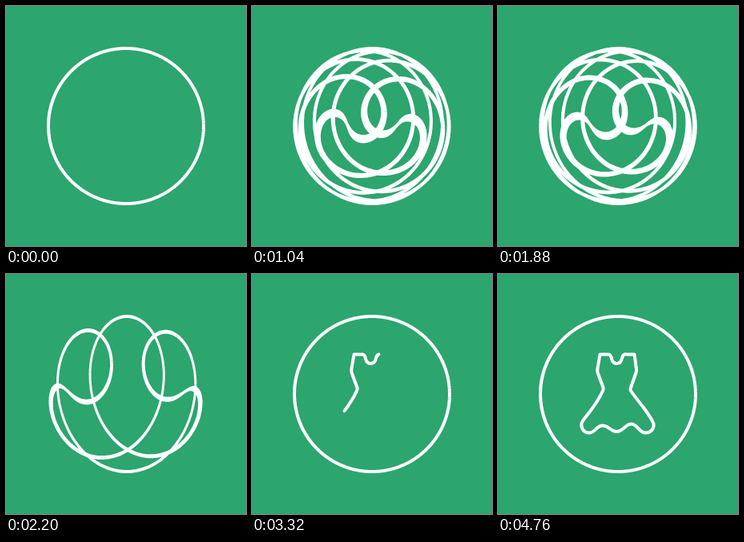
Recreate the animation shown at these times as an HTML page. Size 300 px wide and 300 px high, loop 5000 ms.

```html
<!DOCTYPE html>
<html lang="en">
<head>
<meta charset="utf-8">
<title>Dress icon</title>
<style>
  html, body { margin: 0; width: 100%; height: 100%; overflow: hidden; background: #2ca56e; }
  svg { display: block; width: 100vw; height: 100vh; }
  #ring { fill: #fff; }
  #dress { fill: none; stroke: #fff; stroke-width: 4; stroke-linecap: round; stroke-linejoin: round; }
</style>
</head>
<body>
<svg viewBox="0 0 300 300">
  <path id="ring"/>
  <path id="dress" pathLength="1" d="M158.5 100.5Q156 101 155 105C153.5 114 144 114 142 106Q141 100.5 138 100.5
    L127.5 100.5L124.3 119Q124 122 125 124.5L131.5 142Q132 144 131 146Q126 157 116 170.5L107 182
    C100.5 190 107 199 114.5 198.5C122 198 123 189.5 130.5 189.5C139 189.5 140 197 148.5 197
    C157 197 159 187 167 187.5C175 188 176 199 185 198.5C193 198 197 190 193 184Q190 178 182 167
    Q170 152 166 146Q165 144 166 142L172.5 123.5Q173.5 121 173 119L170.5 100.5Z"/>
</svg>
<script>
const LOOP = 5000, STEP = 40;
const HALF = 1445;                      // twisting up, then the same back
const DRAW_START = 2900, DRAW_END = 4800;
const RADIUS = 97, TUBE = 2, AXIS = 1.3, SEGMENTS = 900;
const ring = document.getElementById('ring');
const dress = document.getElementById('dress');

// A thin torus is twisted around the x axis, then turned around the y axis.
function ringPath(twist, turn) {
  const c = Math.cos(turn), s = Math.sin(turn), rate = twist / RADIUS;

  // Both borders of the projected tube at one place of the ring.
  function edge(i) {
    const angle = i * 2 * Math.PI / SEGMENTS;
    const ux = Math.sin(angle), uy = -Math.cos(angle);
    const x = RADIUS * ux, y = RADIUS * uy, a = rate * (x - AXIS);
    const sin = Math.sin(a), cos = Math.cos(a);
    const project = (dx, dy, dz) => [
      dx * (c + s * y * rate * cos) + dy * s * sin + dz * s * cos,
      -dx * y * rate * sin + dy * cos - dz * sin
    ];
    const [tx, ty] = project(-uy, ux, 0), length = Math.hypot(tx, ty);
    const nx = ty / length, ny = -tx / length;
    const across = ([px, py]) => px * nx + py * ny;
    const w = TUBE * Math.hypot(across(project(ux, uy, 0)), across(project(0, 0, 1)));
    const px = 150 + c * x + s * y * sin, py = 150 + y * cos;
    return [[px - nx * w, py - ny * w], [px + nx * w, py + ny * w]];
  }

  let d = '', [p, q] = edge(0);
  for (let i = 1; i <= SEGMENTS; i++) {
    // A small overlap hides the seams between pieces.
    const [u, v] = edge(i), [u2, v2] = edge(i + .2);
    d += 'M' + [p, q, v, v2, u2, u].map(([x, y]) => x.toFixed(2) + ' ' + y.toFixed(2)).join('L') + 'Z';
    [p, q] = [u, v];
  }
  return d;
}

const easeTwist = x => x < .5 ? 8 * x ** 4 : 1 - 8 * (1 - x) ** 4;
const easeTurn = x => 1 - (1 - x ** 1.5) ** 1.7;

function draw(t) {
  const x = Math.max(0, 1 - Math.abs(t / HALF - 1));
  ring.setAttribute('d', ringPath(4 * Math.PI * easeTwist(x), Math.PI / 2 * easeTurn(x)));

  const left = Math.min(1, Math.max(0, (DRAW_END - t) / (DRAW_END - DRAW_START)));
  const drawn = 1 - left ** 1.6;
  dress.style.display = drawn > 0 ? '' : 'none';
  dress.setAttribute('stroke-dasharray', drawn < 1 ? drawn + ' 2' : 'none');
}

const start = performance.now();
let last = -1;
function tick() {
  const t = Math.floor((performance.now() - start) % LOOP / STEP) * STEP;
  if (t !== last) draw(last = t);
  requestAnimationFrame(tick);
}
tick();
</script>
</body>
</html>
```
